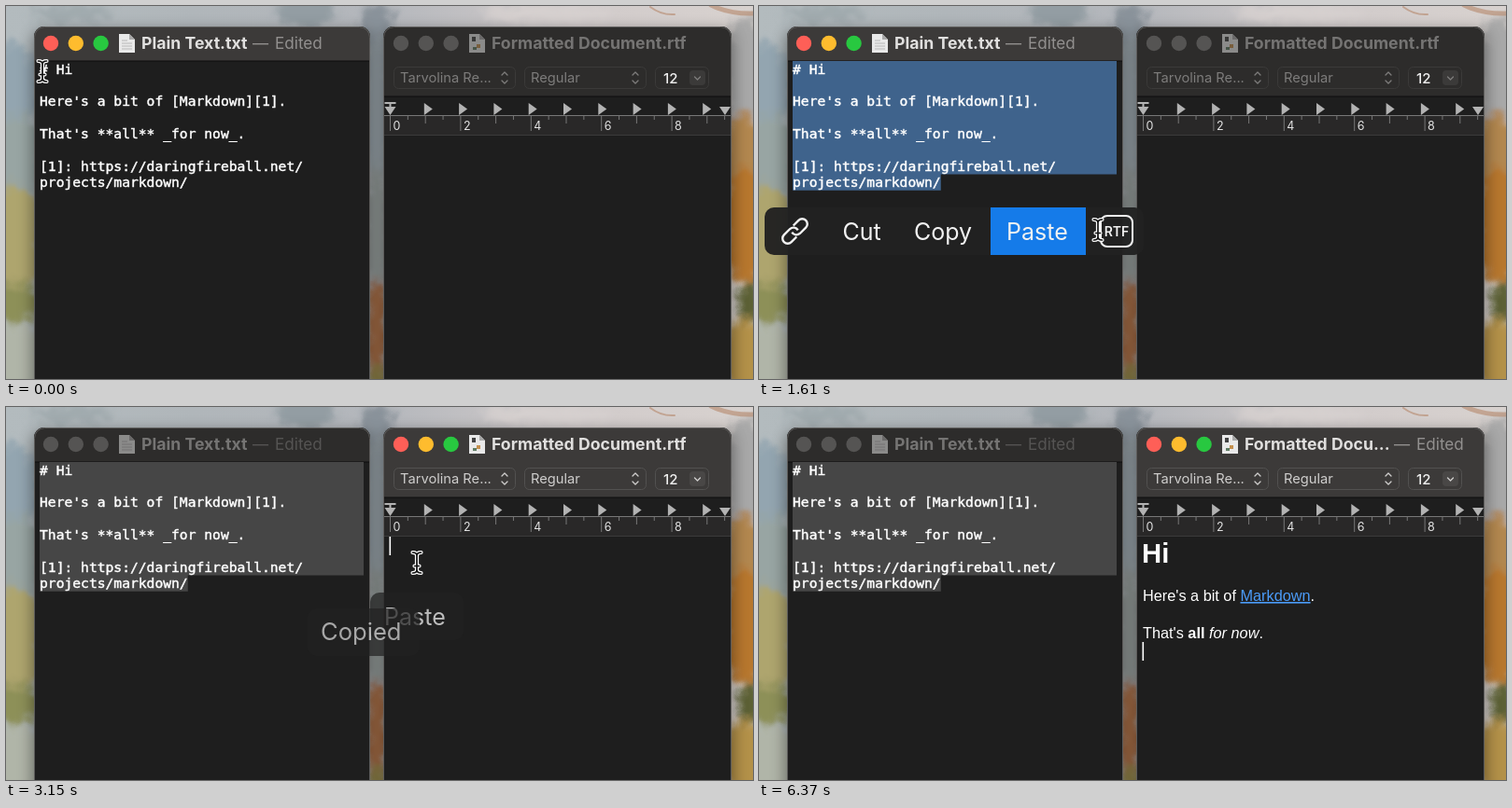
These frames come from a looping animation (800x400 px, 6.44 s). An HTML page:

```html
<!DOCTYPE html>
<html lang="en">
<head>
<meta charset="utf-8">
<title>Markdown to rich text</title>
<style>
html, body { margin: 0; width: 100%; height: 100%; overflow: hidden; background: #1e1e1e; }
svg { display: block; width: 100vw; height: 100vh; font-family: Inter, sans-serif; }
text { white-space: pre; }
.win { --bar: #2d2c2b; --title: #757473; --note: #555453; --field: #7d7c7b; --edge: #3b3a39; --icon: .5; --sel: #464646; }
.win.on { --bar: #3c3a39; --title: #e0dfde; --note: #92908f; --field: #cfcecd; --edge: #525150; --icon: 1; --sel: #3f638c; }
.bar { fill: var(--bar); }
.title { fill: var(--title); font-weight: 700; font-size: 17.7px; }
.note { fill: var(--note); font-size: 17.1px; }
.field { fill: var(--field); font-size: 14.7px; }
.box { fill: none; stroke: var(--edge); }
.mark { fill: none; stroke: var(--field); stroke-width: 1.3; stroke-linecap: round; stroke-linejoin: round; }
.icon { opacity: var(--icon); }
.light { fill: #555453; }
.on .light { fill: var(--c); }
.sel { fill: var(--sel); }
.frame { fill: none; stroke: #5d5c5b; }
.mono { font: 14.65px "DejaVu Sans Mono", monospace; fill: #fff; stroke: #fff; stroke-width: .45px; }
.rich { font: 16.3px "Liberation Sans", Arial, sans-serif; fill: #fff; }
.pop { font-size: 25px; fill: #f2f2f2; }
.panel { fill: #222; fill-opacity: .96; }
.hot { fill: #157be9; }
</style>
</head>
<body>
<svg viewBox="0 0 800 400" preserveAspectRatio="none">
  <defs>
    <filter id="paint" x="-10%" y="-10%" width="120%" height="120%">
      <feTurbulence type="fractalNoise" baseFrequency=".06" numOctaves="2" seed="4" result="noise"/>
      <feGaussianBlur in="SourceGraphic" stdDeviation="5"/>
      <feDisplacementMap in2="noise" scale="18" xChannelSelector="R" yChannelSelector="G"/>
    </filter>
    <filter id="shade" x="-20%" y="-20%" width="140%" height="140%"><feGaussianBlur stdDeviation="8"/></filter>
    <linearGradient id="sky" x2="1" y2="0">
      <stop offset="0" stop-color="#b3bbbe"/><stop offset=".25" stop-color="#b0b6ba"/>
      <stop offset=".5" stop-color="#b4b7bc"/><stop offset=".75" stop-color="#d0caca"/>
      <stop offset="1" stop-color="#d8d2cf"/>
    </linearGradient>
    <clipPath id="menuClip"><rect x="6" y="216" width="406" height="51" rx="10"/></clipPath>
    <g id="page">
      <path d="M121 30h11l6 6v14h-17z" fill="#e9e9e9"/>
      <path d="M132 30v6h6z" fill="#a9a9a9"/>
    </g>
    <path id="beam" d="M-4.5 -11Q0 -11 0 -7.5Q0 -11 4.5 -11M0 -7.5V7.5M-4.5 11Q0 11 0 7.5Q0 11 4.5 11M-2.5 3.5h5"/>
  </defs>

  <rect width="800" height="400" fill="url(#sky)"/>
  <g id="wallpaper" filter="url(#paint)"></g>
  <g fill="none" stroke="#b07a58" stroke-linecap="round" opacity=".5">
    <path d="M690 1q12 9 26 8" stroke-width="2"/>
    <path d="M755 -1q20 10 46 9" stroke-width="5"/>
  </g>
  <g filter="url(#shade)" opacity=".4">
    <rect x="28" y="26" width="364" height="400" rx="12"/>
    <rect x="402" y="26" width="377" height="400" rx="12"/>
  </g>

  <g id="plain" class="win on">
    <rect x="30" y="22" width="360" height="400" rx="11" fill="#1e1e1e"/>
    <path class="bar" d="M30 59V33a11 11 0 0 1 11-11h338a11 11 0 0 1 11 11v26z"/>
    <path d="M30 59h360" stroke="#0c0c0c"/>
    <g class="lights" data-x="48"></g>
    <g class="icon">
      <use href="#page"/>
      <path d="M124 37h6M124 40h11M124 43h11M124 46h11" stroke="#aaa" stroke-width=".8"/>
    </g>
    <text class="title" x="145" y="46">Plain Text.txt</text>
    <text class="note" x="264" y="46">—</text>
    <text class="note" x="288" y="46">Edited</text>
    <path id="selection" class="sel"/>
    <g id="source" class="mono"></g>
    <rect class="frame" x="30.5" y="22.5" width="359" height="400" rx="11"/>
  </g>

  <g id="styled" class="win">
    <rect x="404" y="22" width="373" height="400" rx="11" fill="#1e1e1e"/>
    <path class="bar" d="M404 97V33a11 11 0 0 1 11-11h351a11 11 0 0 1 11 11v64z"/>
    <path d="M404 97h373" stroke="#0c0c0c"/>
    <g class="lights" data-x="423"></g>
    <g class="icon">
      <use href="#page" x="375"/>
      <path d="M499 33h4v5h-4z" fill="#444"/>
      <path d="M504 41h4v4h-4z" fill="#c4904e"/>
      <path d="M500 44h4v3h-4z" fill="#5f7d64"/>
    </g>
    <text id="docTitle" class="title" x="520" y="46"></text>
    <g id="docNote" class="note"><text x="680" y="46">—</text><text x="704" y="46">Edited</text></g>
    <rect class="box" x="415.5" y="65.5" width="130" height="23" rx="5"/>
    <rect class="box" x="555.5" y="65.5" width="130" height="23" rx="5"/>
    <rect class="box" x="695.5" y="65.5" width="57" height="23" rx="5"/>
    <rect x="732" y="69" width="17" height="16" rx="4" fill="#fff" opacity=".07"/>
    <text class="field" x="422" y="82">Tarvolina Re...</text>
    <text class="field" x="562" y="82">Regular</text>
    <text x="704" y="83" font-size="15" font-weight="500" fill="#f0f0f0">12</text>
    <path class="mark" d="M531 74l3-3 3 3M531 80l3 3 3-3M671 74l3-3 3 3M671 80l3 3 3-3M737.5 76l3 3 3-3"/>
    <path d="M404 117h373v21h-373z" fill="#292828"/>
    <path d="M405 117.5h371" stroke="#777"/>
    <path d="M405 138.5h371" stroke="#3b3b3b"/>
    <g id="ruler" fill="#b3b3b3" font-size="12.5"></g>
    <g id="result" class="rich">
      <text x="410" y="167" font-size="29.3" font-weight="700">Hi</text>
      <text x="411" y="208">Here's a bit of <tspan fill="#4b9bf8" text-decoration="underline">Markdown</tspan>.</text>
      <text x="411" y="248">That's <tspan font-weight="700">all</tspan> <tspan font-style="italic">for now</tspan>.</text>
    </g>
    <rect id="caret" x="410.5" width="1.6" height="20" fill="#fff"/>
    <rect class="frame" x="404.5" y="22.5" width="372" height="400" rx="11"/>
  </g>

  <g id="pasteMenu" class="pop">
    <rect class="panel" x="390" y="199" width="100" height="51" rx="10"/>
    <rect id="pasteHot" class="hot" x="390" y="199" width="100" height="51" rx="10"/>
    <text x="405" y="234">Paste</text>
  </g>
  <g id="copied" class="pop">
    <rect class="panel" x="323" y="216" width="120" height="51" rx="10"/>
    <text x="337" y="250" font-size="25.6" fill="#d8d8d8">Copied</text>
  </g>
  <g id="menu" class="pop">
    <rect class="panel" x="6" y="216" width="406" height="51" rx="10"/>
    <rect id="menuHot" class="hot" y="216" height="51" clip-path="url(#menuClip)"/>
    <g fill="none" stroke="#f2f2f2" stroke-width="2.4" transform="translate(38.5 241.5) rotate(-45)">
      <path d="M3 -5.5h8a5.5 5.5 0 0 1 0 11h-9a5.5 5.5 0 0 1 -5 -7"/>
      <path d="M-3 5.5h-8a5.5 5.5 0 0 1 0 -11h9a5.5 5.5 0 0 1 5 7"/>
    </g>
    <text x="89.5" y="251">Cut</text>
    <text x="166" y="251">Copy</text>
    <text x="265" y="251">Paste</text>
    <rect x="366" y="225" width="34" height="33" rx="7" fill="none" stroke="#f2f2f2" stroke-width="2"/>
    <text x="383" y="247" font-size="14" font-weight="600" text-anchor="middle">RTF</text>
  </g>

  <g id="pointer" fill="none" stroke-linecap="round">
    <use href="#beam" stroke="#fff" stroke-width="4.2"/>
    <use href="#beam" stroke="#111" stroke-width="1.7"/>
  </g>
</svg>
<script>
const LOOP = 6440, STEP = 70;
const LEFT = 36, TOP = 59, LINE = 17.35, CHAR = 8.82, RIGHT = 383;
const ACTIVATE = 2700, PASTED = 4200, BLINK = 1060;
const $ = id => document.getElementById(id);
const lines = ["# Hi", "", "Here's a bit of [Markdown][1].", "", "That's **all** _for now_.", "",
  "[1]: https://daringfireball.net/", "projects/markdown/"];

// Soft patches: centre x, centre y, radius x, radius y, colour
const patches = [
  [320, 6, 32, 18, "#939da3"], [70, 8, 45, 10, "#a0aaae"], [8, 85, 28, 45, "#93a5b0"],
  [10, 165, 30, 50, "#98a5a3"], [8, 250, 32, 58, "#aea56e"], [8, 318, 30, 22, "#8d9058"],
  [10, 380, 32, 40, "#b0b5a8"], [397, 20, 18, 24, "#89929a"], [397, 110, 16, 80, "#97a2a8"],
  [397, 240, 14, 70, "#939a98"], [397, 345, 14, 52, "#a46c45"], [397, 398, 14, 14, "#8f8147"],
  [580, 8, 70, 10, "#d6d0cf"], [792, 70, 24, 60, "#a8a8a8"], [790, 165, 26, 50, "#b28750"],
  [792, 235, 26, 62, "#b7772f"], [797, 318, 14, 24, "#5b6035"], [790, 375, 26, 40, "#b3914a"]
];
$("wallpaper").innerHTML = patches.map(([x, y, rx, ry, c]) =>
  `<ellipse cx="${x}" cy="${y}" rx="${rx}" ry="${ry}" fill="${c}"/>`).join("");

document.querySelectorAll(".lights").forEach(g => {
  g.innerHTML = ["#fe5f57", "#febc2e", "#28c840"].map((c, i) =>
    `<circle class="light" style="--c:${c}" cx="${+g.dataset.x + i * 26.8}" cy="40" r="8.2"/>`).join("");
});

$("source").innerHTML = lines.map((s, i) =>
  `<text x="${LEFT}" y="${TOP + 13.5 + i * LINE}">${s}</text>`).join("");

function ruler() {
  const start = 411.5, half = 18.85, tabGap = 37.3;
  let out = `<path d="M405.5 103h12v2h-5v3h5l-6 9-6-9h5v-3h-5zM764 108h12l-6 9z"/>`;
  for (let n = 0; n < 20; n++) {
    const x = start + n * half;
    const height = n % 4 === 0 ? 17 : n % 2 === 0 ? 9 : 5;
    out += `<path d="M${x} 117v${height}" stroke="#777"/>`;
    if (n % 4 === 0) out += `<text x="${x + 3}" y="133" fill="#e2e2e2">${n / 2}</text>`;
  }
  for (let n = 1; n <= 9; n++) out += `<path d="M${start + n * tabGap - 1} 104l9 6.5-9 6.5z"/>`;
  return out;
}
$("ruler").innerHTML = ruler();

// Pointer path: time, x, y
const path = [
  [70, 39, 70], [210, 58, 84], [560, 182, 172], [700, 199, 184], [1050, 199, 184],
  [1330, 262, 232], [1540, 340, 239], [1610, 363, 240], [1680, 382, 242], [2100, 382, 242],
  [2240, 408, 217], [2590, 440, 167], [3300, 440, 167], [3640, 442, 224], [4340, 442, 224],
  [4620, 462, 224]
];
function pointerAt(t) {
  const next = path.findIndex(p => p[0] > t);
  if (next === 0) return path[0].slice(1);
  if (next < 0) return path[path.length - 1].slice(1);
  const [t0, x0, y0] = path[next - 1], [t1, x1, y1] = path[next];
  const k = (t - t0) / (t1 - t0);
  return [x0 + (x1 - x0) * k, y0 + (y1 - y0) * k];
}

const ramp = (t, a, b) => Math.min(1, Math.max(0, (t - a) / (b - a)));
const pulse = (t, a, b, c, d) => ramp(t, a, b) * (1 - ramp(t, c, d));
const show = (id, on) => { $(id).style.display = on ? "" : "none"; };
const fade = (id, v) => { $(id).style.opacity = v; };

function selectionPath(t) {
  if (t < 140) return "";
  const [x, y] = pointerAt(Math.min(t, 700));
  const row = Math.min(7, Math.max(0, Math.floor((y - TOP) / LINE)));
  const col = Math.min(lines[row].length, Math.max(0, Math.round((x - LEFT) / CHAR)));
  const full = row ? `M${LEFT} ${TOP}H${RIGHT}v${row * LINE}H${LEFT}z` : "";
  return full + `M${LEFT} ${TOP + row * LINE}h${col * CHAR}v${LINE}h${-col * CHAR}z`;
}

const buttons = [6, 74, 149, 248, 350, 412];
function hoverMenu(t) {
  const [x, y] = pointerAt(t - STEP);
  const i = buttons.findIndex((b, n) => x >= b && x < buttons[n + 1]);
  const on = y > 216 && i >= 0;
  show("menuHot", on);
  if (on) {
    $("menuHot").setAttribute("x", buttons[i]);
    $("menuHot").setAttribute("width", buttons[i + 1] - buttons[i]);
  }
}

function render(t) {
  const active = t >= ACTIVATE, pasted = t >= PASTED;
  $("plain").classList.toggle("on", !active);
  $("styled").classList.toggle("on", active);
  $("selection").setAttribute("d", selectionPath(t));
  $("docTitle").textContent = pasted ? "Formatted Docu..." : "Formatted Document.rtf";
  show("docNote", pasted);
  show("result", pasted);

  const since = t - (pasted ? PASTED : ACTIVATE);
  show("caret", active && since % BLINK < BLINK / 2);
  $("caret").setAttribute("y", pasted ? 252 : 139);

  hoverMenu(t);
  fade("menu", pulse(t, 840, 980, 2030, 2100));
  fade("copied", pulse(t, 2030, 2240, 3080, 3430) * .92);
  fade("pasteMenu", pulse(t, 2940, 3220, 4130, 4270));
  show("pasteHot", t > 3570);

  const [x, y] = pointerAt(t);
  $("pointer").setAttribute("transform", `translate(${x} ${y})`);
  show("pointer", t < 5600);
}

const begin = performance.now();
function tick() {
  const t = (performance.now() - begin) % LOOP;
  render(Math.floor(t / STEP) * STEP);
  requestAnimationFrame(tick);
}
render(0);
requestAnimationFrame(tick);
</script>
</body>
</html>
```
